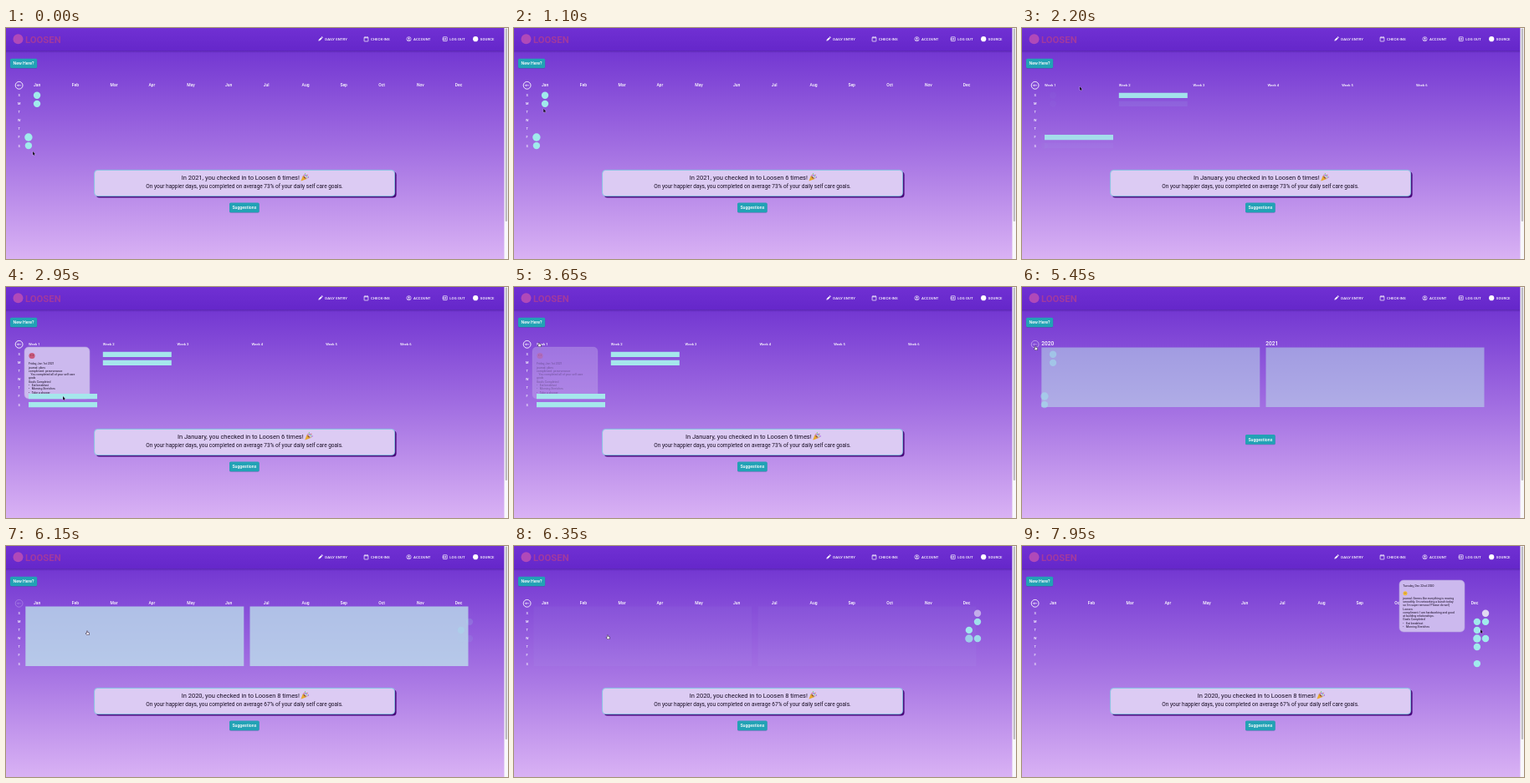
An HTML page with a canvas that plays this animation: 600 px wide and 277 px high, repeating every 8000 ms.

```html
<!DOCTYPE html>
<html lang="en">
<head>
<meta charset="utf-8">
<title>Loosen</title>
<style>
html, body { margin: 0; width: 100%; height: 100%; overflow: hidden; background: #d9b2f4; }
canvas { display: block; width: 600px; height: 277px; }
</style>
</head>
<body>
<canvas id="stage"></canvas>
<script>
const W = 600, H = 277, LOOP = 8000, FADE = 500;
const canvas = document.getElementById('stage');
const ctx = canvas.getContext('2d');
const ratio = window.devicePixelRatio || 1;
canvas.width = W * ratio;
canvas.height = H * ratio;

const AQUA = '#a0ebec', WHITE = '#fff', INK = '#180d24';
const MONTHS = 'Jan Feb Mar Apr May Jun Jul Aug Sep Oct Nov Dec'.split(' ');
const DAYS = [...'SMTWTFS'];

// Moments at which the view changes
const TO_MONTH = 1800, TO_2021 = 4150, TO_YEARS = 5200, TO_2020 = 5950;

// Dates in their order of appearance
const JANUARY = checkIns(2021, 0, [3, 1, 4, 2], 1);
const DECEMBER = checkIns(2020, 11, [22, 28, 30, 23, 27, 21, 24, 26], 23, 27);

// Pointer path: time, x, y
const PATH = [
  [0, 32, 148], [1700, 37, 69], [2200, 69, 70], [2600, 68, 131], [3400, 68, 131], [3650, 30, 67],
  [3900, 16, 69], [5450, 16, 71], [6150, 97, 102], [6350, 112, 107], [6850, 112, 107],
  [7500, 548, 100], [LOOP, 548, 100]
];

const NOTE_JAN = `Friday, Jan 1st 2021
journal: yikes
compliment: perseverance
   You completed all of your self care
goals
Goals Completed
\u2022   Eat breakfast
\u2022   Morning Stretches
\u2022   Take a shower`;
const NOTE_DEC = `journal: Seems like everything is moving
smoothly. I'm networking a bunch today
so I'm super nervous! Please do well,
Loosen.
compliment: I am hardworking and good
at building relationships.
Goals Completed
\u2022   Eat breakfast
\u2022   Morning Stretches`;

const clamp = v => Math.max(0, Math.min(1, v));
const cubic = v => v < 0.5 ? 4 * v ** 3 : 1 - 4 * (1 - v) ** 3;
const fadeIn = (t, start) => cubic(clamp((t - start) / FADE));
const rowY = day => 80.8 + day * 10.05;

// Places each date by its week of the year; the later part waits a little longer.
function checkIns(year, month, dates, busy, pale) {
  const firstDay = new Date(year, 0, 1).getDay();
  const lateFrom = Math.round(dates.length * 0.6);
  return dates.map((date, i) => {
    const dayOfYear = (Date.UTC(year, month, date) - Date.UTC(year, 0, 1)) / 864e5;
    return {
      week: Math.floor((dayOfYear + firstDay) / 7),
      day: (dayOfYear + firstDay) % 7,
      r: date === busy ? 4.7 : 4.2,
      color: date === pale ? '#e1daf3' : AQUA,
      delay: i * 30 + (i < lateFrom ? 0 : 200)
    };
  });
}

function withAlpha(alpha, draw) {
  if (alpha <= 0) return;
  ctx.save();
  ctx.globalAlpha *= alpha;
  draw();
  ctx.restore();
}

function at(x, y, draw, turn = 0, scale = 1) {
  ctx.save();
  ctx.translate(x, y);
  ctx.rotate(turn);
  ctx.scale(scale, scale);
  draw();
  ctx.restore();
}

function text(str, x, y, size, { weight = 500, color = WHITE, align = 'left', spacing = 0 } = {}) {
  ctx.font = `${weight} ${size}px Roboto, sans-serif`;
  ctx.letterSpacing = spacing + 'px';
  ctx.textAlign = align;
  ctx.fillStyle = color;
  ctx.fillText(str, x, y);
  return ctx.measureText(str).width;
}

function paint(fill, stroke, line = 0.7) {
  if (fill) { ctx.fillStyle = fill; ctx.fill(); }
  if (stroke) { ctx.strokeStyle = stroke; ctx.lineWidth = line; ctx.stroke(); }
}

function box(x, y, w, h, r, ...style) {
  ctx.beginPath();
  ctx.roundRect(x, y, w, h, r);
  paint(...style);
}

function disc(x, y, r, ...style) {
  ctx.beginPath();
  ctx.arc(x, y, r, 0, Math.PI * 2);
  paint(...style);
}

function shape(d, ...style) {
  const p = new Path2D(d);
  const [fill, stroke, line = 0.7] = style;
  if (stroke) { ctx.strokeStyle = stroke; ctx.lineWidth = line; ctx.stroke(p); }
  if (fill) { ctx.fillStyle = fill; ctx.fill(p); }
}

function vertical(y0, y1, ...colors) {
  const g = ctx.createLinearGradient(0, y0, 0, y1);
  colors.forEach((c, i) => g.addColorStop(i / (colors.length - 1), c));
  return g;
}

function drawPage() {
  box(0, 0, W, H, 0, vertical(0, H, '#682ace', '#a06ce1', '#d9b2f4'));
  box(0, 27, 595, 3, 0, vertical(27, 30, 'rgba(45,8,120,.35)', 'rgba(45,8,120,0)'));
  box(0, 0, 595, 27, 0, vertical(0, 27, '#7030d3', '#6527ca'));
  box(595.5, 0, 5, H, 0, '#f8f7fa');
  box(596.8, 0.5, 2.3, 231.5, 1.1, '#bdbbc1');
}

const arrow = 'M2.2 0H-2M-.7 -1.3L-2 0L-.7 1.3';

const NAV = [
  [381.3, 'DAILY ENTRY', () => at(0, 0, () => {
    box(-2, -0.9, 4, 1.8, 0, WHITE);
    box(2.4, -0.9, 1.1, 1.8, 0.3, WHITE);
    shape('M-2 -.9L-3.4 0L-2 .9', WHITE);
  }, -Math.PI / 4)],
  [436, 'CHECK-INS', () => {
    box(-2.4, -2.1, 4.8, 4.9, 0.4, null, WHITE);
    shape('M-2.4 -1.4H2.4M-1.3 -3V-2M1.3 -3V-2', null, WHITE);
  }],
  [487, 'ACCOUNT', () => {
    disc(0, 0, 2.6, null, WHITE, 0.6);
    disc(0, -0.7, 0.9, WHITE);
    shape('M-1.6 1.7Q0 .4 1.6 1.7', null, WHITE);
  }],
  [530.3, 'LOG OUT', () => {
    box(-2.4, -2.4, 4.8, 4.8, 0.4, null, WHITE);
    at(-1, 0, () => shape(arrow, null, WHITE), Math.PI);
  }],
  [566.7, 'SOURCE', () => disc(0, 0, 3.1, WHITE)]
];

function drawNav() {
  disc(14.5, 13.2, 6, '#b049b9');
  text('LOOSEN', 23, 17.5, 11.3, { weight: 700, color: '#a1399f' });
  NAV.forEach(([x, label, icon]) => {
    text(label, x, 14.8, 4.3, { spacing: 0.11 });
    at(x - 5.5, 13.2, icon);
  });
}

function button(label, x, y, w, h) {
  box(x, y + 0.5, w, h, 1.6, 'rgba(40,10,100,.3)');
  box(x, y, w, h, 1.6, '#22a2b5');
  text(label, x + w / 2, y + h / 2 + 1.8, 5.2, { align: 'center' });
}

function popper() {
  shape('M0 8L2.2 2L6 5.8Z', '#e9a82c');
  shape('M2.2 2Q5.6 2.4 6 5.8Q3 5 2.2 2', '#9a6440');
  for (let i = 0; i < 7; i++) {
    const angle = -1.7 + i * 0.32, reach = 3 + (i % 2) * 1.4;
    disc(4 + reach * Math.cos(angle), 4 + reach * Math.sin(angle), 0.6, `hsl(${i * 130 + 340} 62% 52%)`);
  }
}

function drawBanner(when, times, percent) {
  box(107.6, 172.3, 359, 31.2, 4, '#48067a');
  box(105.6, 170.4, 359, 31.2, 4, '#dccbf3', '#82c8e2', 0.9);
  const dark = { weight: 400, color: INK, align: 'center' };
  const wide = text(`In ${when}, you checked in to Loosen ${times} times!`, 280.3, 182.3, 7.5, dark);
  at(280.3 + wide / 2 + 1.6, 175.2, popper, 0, 1.05);
  text(`On your happier days, you completed on average ${percent}% of your daily self care goals.`,
    285, 192.4, 6.5, dark);
}

function drawBack(alpha) {
  withAlpha(alpha, () => at(15.6, 68.8, () => {
    disc(0, 0, 4.4, null, WHITE, 0.9);
    shape(arrow, null, WHITE);
  }));
}

function drawDots(list, alphaOf) {
  list.forEach(({ week, day, r, color, delay }) =>
    withAlpha(alphaOf(delay), () => disc(26.9 + week * 10.137, rowY(day), r, color)));
}

function drawBars(list, alphaOf) {
  list.forEach(({ week, day, delay }) =>
    withAlpha(alphaOf(delay), () => box(27 + week * 88.8, rowY(day) - 3.1, 82, 6.3, 0, '#a5e7ec')));
}

function drawYearBoxes(alpha) {
  withAlpha(alpha, () => [23.3, 291.5].forEach(x => box(x, 72.6, 261, 71.4, 0, '#bfe9ec')));
}

function drawLabels(view) {
  if (view === 'years') {
    [2020, 2021].forEach((year, i) => text(year, 23.3 + i * 268, 70.2, 6.5));
    return;
  }
  if (view === 'month') {
    for (let i = 0; i < 6; i++) text('Week ' + (i + 1), 27 + i * 88.8, 69.8, 4.2);
  } else {
    MONTHS.forEach((name, i) => text(name, 33 + i * 45.8, 70, 5));
  }
  DAYS.forEach((d, i) => text(d, 15.6, rowY(i) + 1.4, 3.9, { align: 'center' }));
}

function face(x, y, r, color) {
  disc(x, y, r, color);
  [-1, 1].forEach(side => disc(x + side * r * 0.35, y - r * 0.2, r * 0.15, '#5c2a24'));
}

function noteLines(lines, x, y) {
  lines.split('\n').forEach((s, i) => text(s, x, y + i * 4.3, 3.45, { weight: 400, color: INK }));
}

function drawNote(x, y, alpha, body) {
  withAlpha(alpha, () => {
    box(x, y, 78, 62, 5, '#ccb9ee', '#b3a0dd', 0.6);
    body();
  });
}

function drawNotes(t) {
  const jan = clamp((t - 2600) / 200) * clamp((3730 - t) / 220);
  drawNote(22, 72, jan, () => {
    face(31, 82.5, 3.6, '#c9587c');
    noteLines(NOTE_JAN, 27, 93.2);
  });
  drawNote(451, 41, clamp((t - 7500) / 200), () => {
    noteLines('Tuesday, Dec 22nd 2020', 455.3, 49.3);
    face(458, 56.8, 2.5, '#efb93a');
    noteLines(NOTE_DEC, 455.3, 63.6);
  });
}

function pointerAt(t) {
  const i = PATH.findIndex(p => p[0] > t);
  const [t0, x0, y0] = PATH[i - 1], [t1, x1, y1] = PATH[i];
  const k = (t - t0) / (t1 - t0);
  return [x0 + (x1 - x0) * k, y0 + (y1 - y0) * k];
}

function drawPointer(t) {
  const [x, y] = pointerAt(t);
  const hand = t > 3600 && t < 7000;
  at(x, y, () => hand
    ? shape('M-.5 0H.4V1.6L2.3 2V4.4H-.6L-1.6 2.6H-.5Z', '#ece6f4', INK, 0.9)
    : shape('M0 0V4.4L1 3.5L1.7 5L2.4 4.7L1.8 3.3H3.1Z', INK, 'rgba(255,255,255,.5)'));
}

function viewAt(t) {
  if (t < TO_MONTH) return '2021';
  if (t < TO_2021) return 'month';
  if (t < TO_YEARS) return '2021';
  return t < TO_2020 ? 'years' : '2020';
}

function draw(t) {
  ctx.setTransform(ratio, 0, 0, ratio, 0, 0);
  const view = viewAt(t);
  drawPage();
  drawNav();
  button('New Here?', 4.9, 36.8, 32.3, 11.4);

  const years = fadeIn(t, TO_YEARS) - fadeIn(t, TO_2020);
  drawYearBoxes(years);
  drawBack(1 - years);
  drawLabels(view);

  drawDots(JANUARY, delay => t < TO_2021
    ? 1 - fadeIn(t, TO_MONTH)
    : fadeIn(t, TO_2021 + delay) * (1 - fadeIn(t, TO_YEARS)));
  drawDots(DECEMBER, delay => fadeIn(t, TO_2020 + delay));
  drawNotes(t);
  drawBars(JANUARY, delay => fadeIn(t, TO_MONTH + delay) * (1 - fadeIn(t, TO_2021)));

  if (view === '2020') drawBanner('2020', 8, 67);
  else if (view !== 'years') drawBanner(view === 'month' ? 'January' : '2021', 6, 73);
  button('Suggestions', 267, view === 'years' ? 177 : 209.4, 35.7, 11.8);

  drawPointer(t);
}

function tick() {
  draw(performance.now() % LOOP);
  requestAnimationFrame(tick);
}
tick();
</script>
</body>
</html>
```
